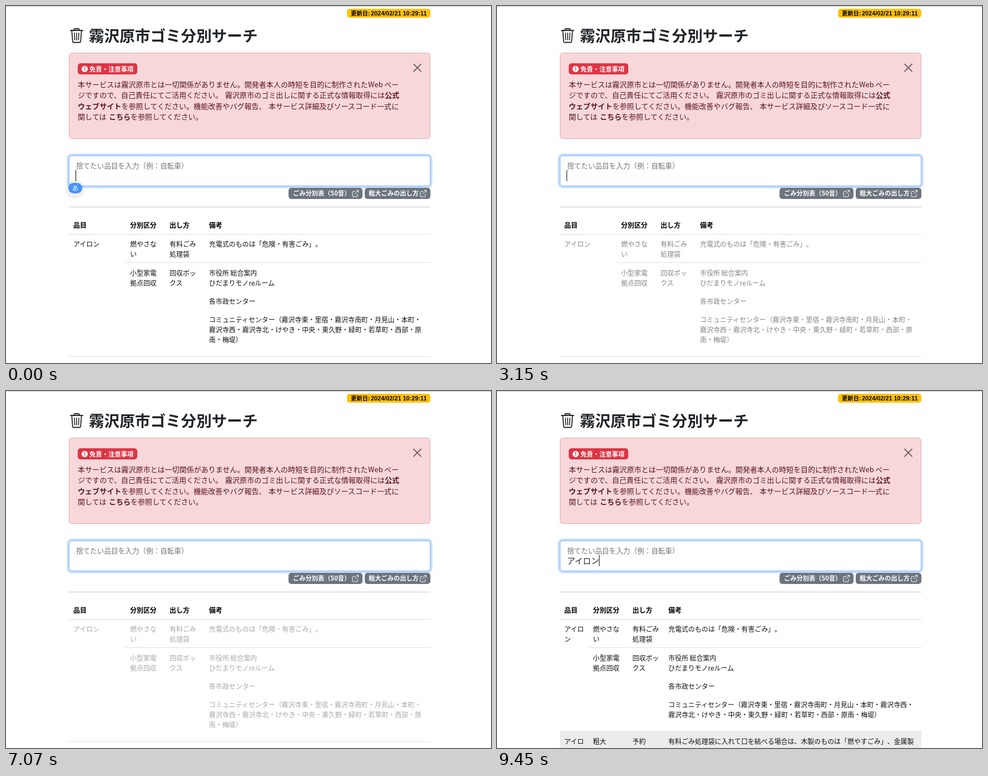
Animation, 872 px wide and 642 px high, one loop 9.94 s. Source, as an HTML page:

```html
<!DOCTYPE html>
<html lang="ja">
<head>
<meta charset="utf-8">
<title>ゴミ分別サーチ</title>
<style>
html, body { margin: 0; width: 100%; height: 100%; overflow: hidden; background: #fff; }
svg { display: block; font-family: "Noto Sans CJK JP", "Noto Sans CJK", sans-serif; text-spacing-trim: space-all; }
.bold { font-weight: 700; }
.serif { font-family: "Noto Serif", serif; }
.sans { font-family: "Liberation Sans", sans-serif; }
.popup { filter: drop-shadow(0 5px 5px rgba(0, 0, 0, .22)); }
</style>
</head>
<body>
<svg width="872" height="642" viewBox="0 0 872 642">
  <defs>
    <g id="link" fill="none" stroke="#fff" stroke-linecap="round" stroke-linejoin="round">
      <path d="M6 2.5H2a1 1 0 0 0-1 1V11a1 1 0 0 0 1 1h7a1 1 0 0 0 1-1V7M8 .5h3.5V4M11.5.5 5 7"/>
    </g>
  </defs>
  <path d="M0 .5H872" stroke="#c4c4c4"/>
  <rect x="613" y="5" width="150" height="16" rx="5" fill="#ffc107"/>
  <g fill="none" stroke="#212529" stroke-width="1.8" stroke-linecap="round" stroke-linejoin="round">
    <path d="M116 44H138M122.300 43V42.500Q122.300 41 124 41H130Q131.700 41 131.700 42.500V43"/>
    <path d="M118.300 44.500 119.800 63.500Q120 65.500 122 65.500H132Q134 65.500 134.200 63.500L135.700 44.500"/>
    <path d="M123 48.500 123.600 61M127 48.500V61M131 48.500 130.400 61" stroke-width="1.6"/>
  </g>
  <rect x="113.500" y="84.500" width="649" height="154" rx="5" fill="#f8d7da" stroke="#e2abb2"/>
  <rect x="129" y="103" width="107" height="20" rx="5" fill="#dc3545"/>
  <circle cx="141.500" cy="113.300" r="5.600" fill="#fff"/>
  <path d="M141.500 110V113.800M141.500 115.800V116.300" stroke="#dc3545" stroke-width="1.5" stroke-linecap="round"/>
  <path d="M733 104.500 746 117.500M746 104.500 733 117.500" stroke="rgba(0,0,0,.55)" stroke-width="1.8" stroke-linecap="round"/>
  <rect x="111.500" y="267.500" width="653" height="58" rx="7" fill="#fff" stroke="#c2dbfe" stroke-width="4"/>
  <rect x="113.500" y="269.500" width="649" height="54" rx="5" fill="#fff" stroke="#86b7fe"/>
  <g fill="#6c757d">
    <rect x="508" y="327" width="133" height="20" rx="5"/>
    <rect x="645" y="327" width="118" height="20" rx="5"/>
  </g>
  <use href="#link" x="622" y="331"/>
  <use href="#link" x="744" y="331"/>
  <path d="M113 361.500H763" stroke="#c8c8c8"/>
  <g id="labels"></g>
  <g id="table"></g>
  <g id="input"></g>
</svg>
<script>
const LOOP = 9940, STEP = 70, CELL = 11.94, GLYPH = 14.6;
const $ = id => document.getElementById(id);

// y is the middle of the line; "|" breaks lines
const text = (x, y, str, size, fill = '#111', cls = '', lead = 18) => str.split('|').map((line, i) =>
  `<text x="${x}" y="${y + i * lead}" dy=".38em" font-size="${size}" fill="${fill}" class="${cls}">${line}</text>`).join('');
const rule = (y, x = 113, end = 763, color = '#dcdfe2') => `<path d="M${x} ${y}H${end}" stroke="${color}"/>`;

const RED = '#58151c';
$('labels').innerHTML = [
  [620, 13, '更新日:', 10.3, '#000', 'bold'],
  [656, 13, '2024/02/21 10:29:11', 10.9, '#000', 'bold sans'],
  [149, 53.5, '霧沢原市ゴミ分別サーチ', 27.6, '#212529', 'bold'],
  [150, 113.5, '免責・注意事項', 11.3, '#fff', 'bold'],
  [129, 141, '本サービスは霧沢原市とは一切関係がありません。開発者本人の時短を目的に制作された', 13.06, RED],
  [651, 141, 'Web', 13.06, RED],
  [680, 141, 'ペー', 13.06, RED],
  [129, 160.5, 'ジですので、自己責任にてご活用ください。', 13.06, RED],
  [394, 160.5, '霧沢原市のゴミ出しに関する正式な情報取得には', 13.06, RED],
  [681, 160.5, '公式', 13.06, RED, 'bold'],
  [129, 180, 'ウェブサイト', 13.06, RED, 'bold'],
  [207.5, 180, 'を参照してください。機能改善やバグ報告、', 13.06, RED],
  [472, 180, '本サービス詳細及びソースコード一式に', 13.06, RED],
  [129, 199.5, '関しては', 13.06, RED],
  [185, 199.5, 'こちら', 13.06, RED, 'bold'],
  [224, 199.5, 'を参照してください。', 13.06, RED],
  [126, 287, '捨てたい品目を入力（例：自転車）', 12.6, '#6f767c'],
  [516, 337, 'ごみ分別表（50音）', 11.25, '#fff', 'bold'],
  [652, 337, '粗大ごみの出し方', 11.25, '#fff', 'bold']
].map(a => text(...a)).join('');

// rows: [y, one text per column]; rules: [y, left edge]; extra: [x, y, text, size, class]
const HEAD = ['品目', '分別区分', '出し方', '備考'];
const ironRows = (name, centers) => [
  [428, name, '燃やさな|い', '有料ごみ|処理袋', '充電式のものは「危険・有害ごみ」。'],
  [480, '', '小型家電|拠点回収', '回収ボッ|クス', '市役所 総合案内|ひだまりモノreルーム'],
  [531, '', '', '', '各市政センター'],
  [564, '', '', '', 'コミュニティセンター（' + centers]
];
const BAG = '有料ごみ|処理袋';
const TABLES = {
  none: { cols: [121, 253, 466, 639], head: HEAD, rules: [], rows: [] },
  all: {
    cols: [121, 223, 294, 365], head: HEAD, rules: [[461.5, 215], [630.5]],
    rows: ironRows('アイロン', '霧沢寺東・里宿・霧沢寺南町・月見山・本町・|霧沢寺西・霧沢寺北・けやき・中央・東久野・緑町・若草町・西部・原|南・梅堤）')
  },
  bike: {
    cols: [121, 273.5, 326, 390.5], head: ['品目', '分別区|分', '出し方', '備考'],
    rules: [[480], [531.5], [583.5], [635]],
    rows: [
      [446, '自転車', '粗大', '予約', '子ども用・折りたたみ式なども含む。電動の場合はバッテリーの部|分は取り外して「危険・有害ごみ」に出してください。'],
      [498, '自転車の空気入れ', '燃やさ|ない', BAG, '有料ごみ処理袋に入れて口が結べない場合は「粗大ごみ」。'],
      [549.5, '自転車のタイヤ（チュー|ブ）', '燃やす', BAG, ''],
      [601, 'タイヤ（自転車・一輪|車・運搬作業具用）', '燃やす', BAG, 'ホイールが付いている場合は「燃やさないごみ」。有料ごみ処理袋|に入れて口が結べない場合は「粗大ごみ」。']
    ]
  },
  pc: {
    cols: [121, 221, 264, 328], head: ['品目', '分別|区分', '出し方', '備考'],
    rules: [[497.5], [567.5, 213], [637.5]],
    rows: [
      [446, 'キーボード（パ|ソコン機器）', '燃や|さな|い', BAG, '有料ごみ処理袋に入れて口が結べない場合は「粗大ごみ」。'],
      [516, 'ノート型パソコ|ン', '収集|不可', 'パソコン|リサイク|ル', '端末機器2C循環会議'],
      [585, '', '宅配|便回|収', 'インター|ネット申|込み', 'モノワタシサービスセンター（|み']
    ],
    extra: [
      [440, 516, '(00-0000-0000)', 12.6], [531, 516, 'にお問い合わせください。', CELL],
      [495, 585, 'https://mwts.example/', 11.6, 'serif'], [622.5, 585, '）ホームページから申込', CELL]
    ]
  },
  iron: {
    cols: [121, 172.5, 243.5, 308], head: HEAD, rules: [[461.5, 165], [612]],
    rows: [
      ...ironRows('アイロ|ン', '霧沢寺東・里宿・霧沢寺南町・月見山・本町・霧沢寺西・|霧沢寺北・けやき・中央・東久野・緑町・若草町・西部・原南・梅堤）'),
      [630, 'アイロ', '粗大', '予約', '有料ごみ処理袋に入れて口を結べる場合は、木製のものは「燃やすごみ」、金属製']
    ]
  }
};

// [time, table, fade start]
const VIEWS = [
  [0, 'all', -1000], [70, 'none'], [910, 'bike', 870], [2870, 'all', 2850], [3430, 'none'],
  [5110, 'pc', 5070], [6860, 'all', 6840], [7280, 'none'], [8050, 'iron', 8010]
];
const TYPING = [
  [0, ''], [70, 'ｊ'], [140, 'じ'], [210, 'じｔ'], [350, 'じて'], [420, 'じてｎ'], [490, 'じてんｓ'],
  [630, 'じてんｓｈ'], [770, 'じてんしゃ'], [910, '自転車'], [2520, '自転'], [2660, '自'], [2800, ''],
  [3430, 'ｐ'], [3500, 'ぱ'], [3640, 'ぱｓ'], [3780, 'ぱそ'], [3850, 'ぱそｋ'], [3920, 'ぱそこ'],
  [4060, 'ぱそこｎ'], [4830, 'ぱそこん'], [5110, 'パソコン'], [6370, 'パソコ'], [6510, 'パソ'],
  [6650, 'パ'], [6790, ''], [7280, 'あ'], [7420, 'あい'], [7490, 'あいｒ'], [7630, 'あいろ'],
  [7700, 'あいろｎ'], [7840, 'あいろん'], [8050, 'アイロン']
];
const CARET_OFF = [[1960, 2520], [4550, 4620], [6020, 6510], [6980, 7280], [8620, 9310]];
const WORDS = {
  じ: ['自転車', '自転車上'],
  ぱ: ['パソコン', 'パソコン上', 'パソコンデスク'],
  あ: ['アイロン', 'アイロン台']
};

const at = (list, t) => list.filter(e => e[0] <= t).pop();

// cubic-bezier(.25, .1, .25, 1)
function ease(x) {
  if (x <= 0) return 0;
  if (x >= 1) return 1;
  const curve = (s, a, b) => 3 * a * s * (1 - s) ** 2 + 3 * b * s * s * (1 - s) + s ** 3;
  let lo = 0, hi = 1;
  for (let i = 0; i < 20; i++) {
    const mid = (lo + hi) / 2;
    if (curve(mid, .25, .25) < x) lo = mid; else hi = mid;
  }
  return curve(lo, .1, 1);
}

function drawTable(t) {
  const [, name, start = 0] = at(VIEWS, t);
  const { cols, head, rules, rows, extra = [] } = TABLES[name];
  const bottom = head.some(h => h.includes('|')) ? 412 : 394;
  let out = '';
  if (name === 'iron' && t >= 9310) out += '<rect x="113" y="612" width="650" height="30" fill="#ececec"/>';
  head.forEach((h, i) => out += text(cols[i], bottom - 18 * (h.split('|').length - 1), h, CELL, '#000', 'bold'));
  out += rule(bottom + 16.5) + rules.map(r => rule(...r)).join('');
  if (name === 'none') {
    out += rule(426.5, 102, 774, '#cfcfcf') + '<circle cx="367" cy="459" r="6" fill="#212529"/>' +
      text(381, 459, '2024 © Sorahiko Mize', 12.5, '#212529', 'serif');
  }
  out += `<g opacity="${ease((t - start) / 1000).toFixed(3)}">`;
  for (const [y, ...cells] of rows) cells.forEach((c, i) => out += text(cols[i], y, c, CELL));
  for (const [x, y, str, size, cls] of extra) out += text(x, y, str, size, '#111', cls);
  return out + '</g>';
}

function drawPopup(typed) {
  const first = typed[0], wide = typed.length > 3 && /[んゃ]$/.test(typed);
  const words = WORDS[first].slice(0, wide ? 3 : 2);
  const w = wide ? 151 : 120, line = 315.5 + words.length * 16.2;
  return `<g class="popup"><rect x="121.500" y="315.500" width="${w}" height="${line - 298.5}" fill="#fff" stroke="#b4b4b4"/></g>` +
    text(126, 324, words.join('|'), 12, '#000', '', 16) +
    (first === 'じ' ? '' : text(72 + w, 324, 'カタカナ', 10.2, '#999')) +
    rule(line, 122, 121 + w, '#b8384c') + text(126, line + 9, 'Tab キーで選択', 12, '#000');
}

function drawInput(t) {
  const typed = at(TYPING, t)[1], end = 126 + GLYPH * typed.length;
  let out = text(126, 305, typed, GLYPH, '#212529');
  if (/[ぁ-んａ-ｚ]/.test(typed)) {
    out += `<path d="M126 313.800H${end - .5}" stroke="#3f7fd0" stroke-width="1.4"/>`;
    if (WORDS[typed[0]]) out += drawPopup(typed);
  }
  if (t < STEP) {
    out += '<circle cx="124.500" cy="329" r="17" fill="#000" opacity=".06"/>' +
      '<rect x="112" y="318" width="25" height="19" rx="9.500" fill="#4793f5"/>' + text(119, 327.5, 'あ', 11, '#fff');
  }
  if (!CARET_OFF.some(([a, b]) => t >= a && t < b))
    out += `<path d="M${end - .5} 295V315" stroke="#212529" stroke-width="1.2"/>`;
  return out;
}

let last = -1;
function tick() {
  const t = Math.floor(performance.now() % LOOP / STEP) * STEP;
  if (t !== last) {
    last = t;
    $('table').innerHTML = drawTable(t);
    $('input').innerHTML = drawInput(t);
  }
  requestAnimationFrame(tick);
}
tick();
</script>
</body>
</html>
```
